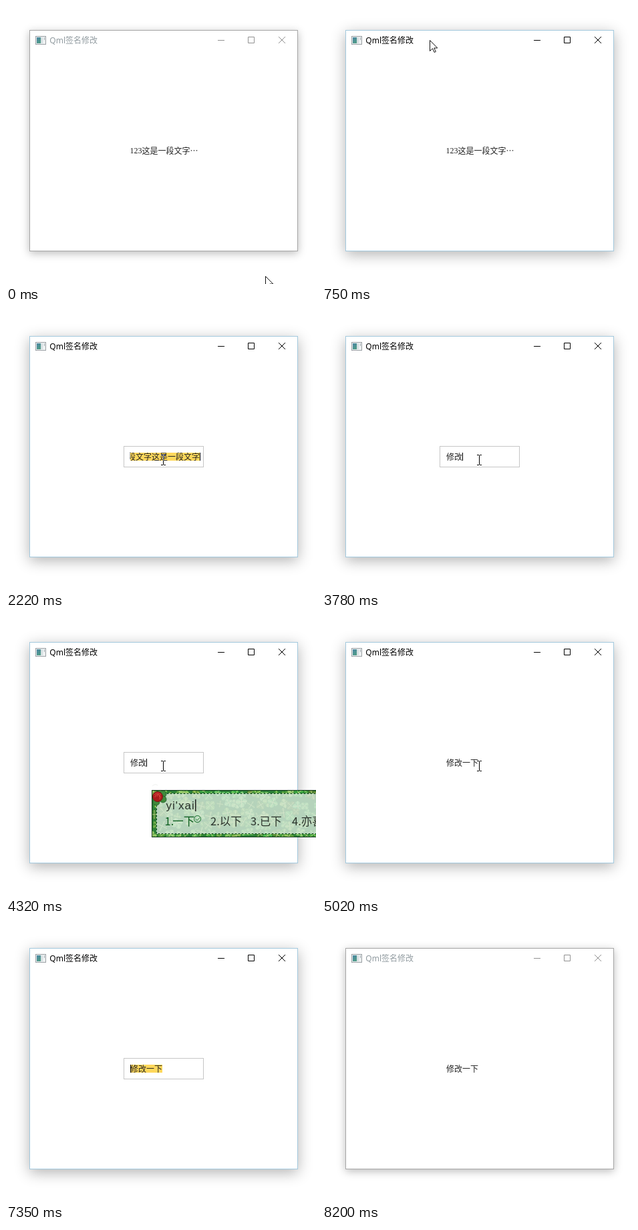
An HTML page for the animation above (8.27 s loop, 464 by 417 pixels).

```html
<!DOCTYPE html>
<html lang="zh-CN">
<head>
<meta charset="utf-8">
<title>Qml签名修改</title>
<style>
html, body { margin: 0; width: 100%; height: 100%; overflow: hidden; background: #fff; }
#win {
  position: absolute; left: 35px; top: 36px; width: 400px; height: 330px;
  border: 1px solid #a6a6a6; background: #fff;
  box-shadow: 0 3px 12px rgba(0, 0, 0, .27);
}
.active #win { border-color: #a3c9de; box-shadow: 0 5px 20px rgba(0, 0, 0, .3); }
svg { position: absolute; left: 0; top: 0; }
text { font-family: "Noto Sans CJK SC", "Noto Sans CJK", "Noto Sans CJK JP", sans-serif; font-size: 12px; white-space: pre; }
#title { fill: #919ba0; }
#buttons { fill: none; stroke: #919191; }
.active #title { fill: #000; }
.active #buttons { stroke: #000; }
#title .latin { font-family: "Noto Sans", sans-serif; }
#words, #digits { fill: #222; }
#digits { font-family: "Liberation Serif", serif; }
#ime text { font-size: 16.5px; fill: #2a322a; }
#ime #pinyin { font-family: "Liberation Sans", sans-serif; font-size: 17px; letter-spacing: 1px; }
#ime .first { fill: #0a5c1c; }
#ibeam { mix-blend-mode: difference; }
</style>
</head>
<body>
<div id="win"></div>
<svg width="464" height="417" viewBox="0 0 464 417">
  <defs>
    <linearGradient id="teal" x2="0.6" y2="1">
      <stop stop-color="#4d86a5"/><stop offset="1" stop-color="#4d9a86"/>
    </linearGradient>
    <clipPath id="field"><rect x="185" y="205" width="106" height="24"/></clipPath>
    <clipPath id="panel"><rect x="219" y="259" width="245" height="69"/></clipPath>
    <g id="clover">
      <circle cx="-3" cy="-2.6" r="3.8"/><circle cx="3" cy="-2.6" r="3.8"/>
      <circle cx="3" cy="3" r="3.8"/><circle cx="-3" cy="3" r="3.8"/>
      <path d="M-5-5L5 5M5-5L-5 5" stroke="#cfe08a" stroke-width=".7"/>
    </g>
  </defs>

  <g id="icon">
    <rect x="44.5" y="45.5" width="15" height="12" fill="#eef1f2" stroke="#9aa0a4"/>
    <rect x="46" y="47" width="6" height="9" fill="url(#teal)"/>
    <rect x="52" y="47" width="3" height="9" fill="#d5dfe1"/>
    <path d="M57.5 47v4" stroke="#a9b2b6"/>
  </g>
  <g id="title"><text class="latin" x="65.3" y="56">Qml</text><text x="89" y="56">签名修改</text></g>
  <path id="buttons" d="M317 51.5h10M362.5 46.5h9v9h-9zM408 46l10 10M418 46l-10 10"/>

  <rect id="box" x="176.5" y="201.5" width="119" height="31" fill="#fff" stroke="#c6c6c6"/>
  <rect id="mark" y="211" height="12" fill="#ffd85c"/>
  <text id="digits" x="185.5" y="221">123</text>
  <g clip-path="url(#field)"><text id="words" y="221.5"></text></g>
  <rect id="caret" y="211" width="1" height="12"/>

  <g id="ime">
    <path d="M219 252q4-4 8-1" fill="none" stroke="#eff1ef"/>
    <rect x="218.5" y="258.5" width="260" height="70" fill="#2c8038"/>
    <g clip-path="url(#panel)" id="leaves"></g>
    <g fill="none">
      <rect x="225.5" y="263.5" width="260" height="60" fill="#dcebe0" fill-opacity=".78" stroke="#e6f0e4"/>
      <rect x="225.5" y="263.5" width="260" height="60" stroke="#0d4a20" stroke-dasharray="3 2"/>
      <rect x="218.5" y="258.5" width="260" height="70" stroke="#0c3517"/>
    </g>
    <g fill="#3f8a3c" stroke="#1c5a26" stroke-width=".8">
      <circle cx="235" cy="264" r="5"/><circle cx="235" cy="272" r="5"/>
      <circle cx="225" cy="276" r="5"/><circle cx="227" cy="268" r="7.6" fill="#a91c1c" stroke="#6b1010"/>
    </g>
    <path d="M223 269a4 4 0 1 1 6 3M226 268a2 2 0 1 1 3 1M222 265q5-5 10 0" fill="none" stroke="#d9483f"/>
    <text id="pinyin" x="239.5" y="287"></text>
    <rect id="imeCaret" y="272" width="1.5" height="18" fill="#222"/>
    <text class="first" x="237.5" y="310.5">1.<tspan dx="-2">一下</tspan></text>
    <text x="306" y="310.5">2.以下</text>
    <text x="366" y="310.5">3.已下</text>
    <text x="428" y="310.5">4.亦喜</text>
    <path d="M281.5 301.5a5 5 0 1 0 10 0a5 5 0 1 0-10 0M284 301.5l2 2l4-4" fill="none" stroke="#17702a"/>
  </g>

  <path id="arrow" d="M.5.5v16l4-3.7l2.6 5.7l2.2-1l-2.5-5.5h5z" fill="#fff" stroke="#111"/>
  <path id="ibeam" d="M-3-7.5h3M1-7.5h3M.5-7v14M-3 7.5h3M1 7.5h3" fill="none" stroke="#fff"/>
</svg>
<script>
const LOOP = 8270, STEP = 75, BLINK = 520;
const LEFT = 186, EM = 12;
const OPEN = 1520, REPLACE = 3780, COMPOSE = 3930, COMMIT = 4490, DONE = 5020;
const REOPEN = 6340, DRAG = 6740, LEAVE = 8200;

const $ = id => document.getElementById(id);
const show = (id, on) => { $(id).style.display = on ? '' : 'none'; };
const set = (id, name, value) => $(id).setAttribute(name, value);
const within = (t, from, to) => t >= from && t < to;

// pointer key points: time, x, y
const route = [
  [0, 388, 405], [750, 161, 51], [825, 170, 55], [1210, 240, 245], [1440, 235, 222],
  [6060, 235, 222], [6300, 263, 220], [6675, 263, 220], [6750, -400, 220],
  [7505, -47, 197], [7730, 627, 353], [7890, 455, 388], [7970, 500, 440]
];

// the blink starts over at each of these
const wakes = [OPEN, 2220, REPLACE, 4320, REOPEN, 7350];

function pointer(t) {
  const now = Math.floor((t + 10) / STEP) * STEP;
  const i = route.findLastIndex(key => key[0] <= now);
  const [t0, x0, y0] = route[i], [t1, x1, y1] = route[i + 1] || [LOOP, x0, y0];
  const u = (now - t0) / (t1 - t0), s = u * u * (3 - 2 * u);
  return [x0 + (x1 - x0) * s, y0 + (y1 - y0) * s].map(Math.round);
}

function phrase(t) {
  if (t < OPEN) return '这是一段文字…';
  if (t < REPLACE) return '段文字这是一段文字';
  return t < COMMIT + STEP ? '修改' : '修改一下';
}

// number of selected letters, counted from the end
function selected(t, length) {
  if (within(t, OPEN, REPLACE) || within(t, REOPEN, DRAG)) return length;
  return within(t, DRAG, LEAVE) ? Math.min(length, 2 * Math.floor((t - DRAG) / STEP)) : 0;
}

function blinkOn(t) {
  const wake = wakes.findLast(w => w <= t);
  return Math.floor((t - wake) / BLINK) % 2 === 0 && !within(t, DRAG, 7350);
}

function drawText(t) {
  const words = phrase(t), n = words.length;
  const editing = within(t, OPEN, DONE) || within(t, REOPEN, LEAVE);
  const end = Math.min(LEFT + n * EM, 290);
  const from = Math.max(end - selected(t, n) * EM, LEFT);
  $('words').textContent = words;
  set('words', 'x', t < OPEN ? LEFT + 17.5 : end - n * EM);
  set('mark', 'x', from);
  set('mark', 'width', end - from);
  set('caret', 'x', t < DRAG ? end : from);
  show('caret', editing && blinkOn(t));
  show('box', editing);
  show('digits', t < OPEN);
}

function drawIme(t) {
  const open = within(t, COMPOSE, COMMIT);
  show('ime', open);
  if (!open) return;
  $('pinyin').textContent = "yi'xai".slice(0, 2 + 2 * Math.floor((t - COMPOSE) / STEP));
  set('imeCaret', 'x', Math.round(239.5 + $('pinyin').getComputedTextLength()));
}

function drawPointer(t) {
  const beam = within(t, OPEN, DRAG);
  show('arrow', !beam);
  show('ibeam', beam);
  set(beam ? 'ibeam' : 'arrow', 'transform', `translate(${pointer(t)})`);
}

function growLeaves() {
  let seed = 11, out = '';
  const rnd = () => (seed = seed * 16807 % 2147483647) / 2147483647;
  for (let y = 260; y < 330; y += 15) {
    for (let x = 218; x < 470; x += 12) {
      const tint = `hsl(${90 + rnd() * 35} 45% ${36 + rnd() * 24}%)`;
      out += `<use href="#clover" fill="${tint}" stroke="#1f6a2d" stroke-width=".6"
        transform="translate(${x + rnd() * 8} ${y + rnd() * 8}) rotate(${rnd() * 90}) scale(${.7 + rnd() * .5})"/>`;
    }
  }
  $('leaves').innerHTML = out;
}

growLeaves();
const start = performance.now();
function tick() {
  const t = (performance.now() - start) % LOOP;
  document.body.className = within(t, 670, LEAVE) ? 'active' : '';
  drawText(t);
  drawIme(t);
  drawPointer(t);
  requestAnimationFrame(tick);
}
tick();
</script>
</body>
</html>
```
